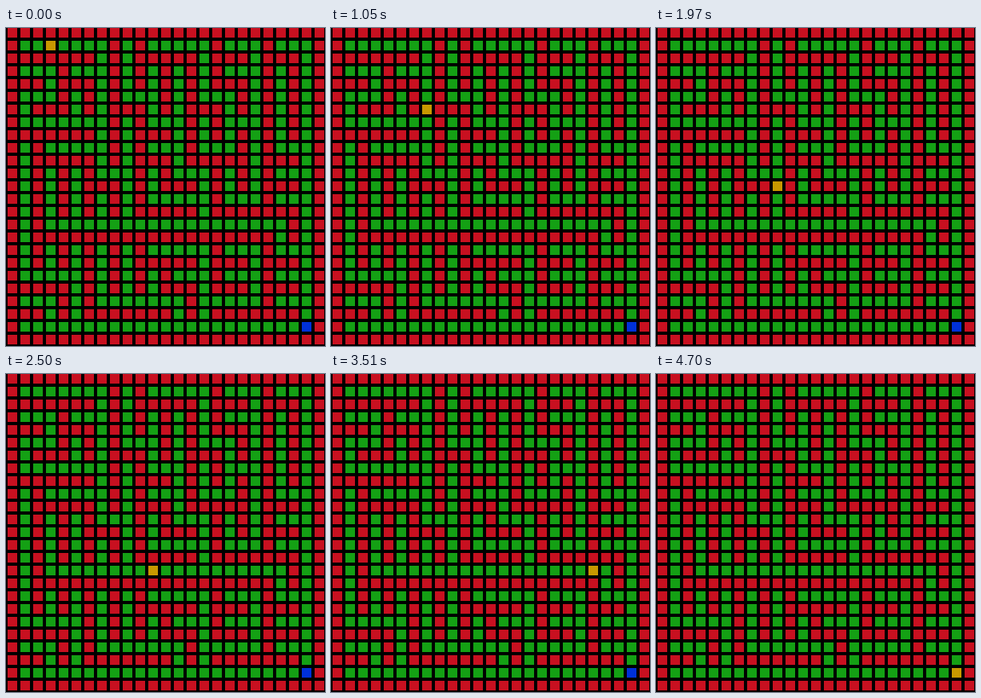
Animation, 399 px wide and 398 px high, one loop 5030 ms. Source, as an HTML page with a canvas:

```html
<!DOCTYPE html>
<html>
<head>
<meta charset="utf-8">
<title>Maze walk</title>
<style>
html, body { margin: 0; height: 100%; overflow: hidden; background: #000; }
canvas { display: block; }
</style>
</head>
<body>
<canvas width="399" height="398"></canvas>
<script>
const ctx = document.querySelector('canvas').getContext('2d');
const LOOP = 5030, SIZE = 25, PITCH = 16, CELL = 12;
const WALL = '#c81020', FLOOR = '#14a014', GOAL = '#0030d8', WALKER = '#c89800';

// Corridors, in cell coordinates
const corridors = new Path2D(`
  M1 1H7V11H9V15 M7 3H5 M5 5V7 M1 3H3V5H1V7H7 M3 9H7
  M9 1V5H11V3 M11 5V7H13 M13 3V11H15V15 M11 9H13
  M11 1H15V5H17V9H15V7 M17 1H19V13H17V11 M17 3H19 M17 7H19
  M21 1H23V23H1 M21 3V9H23 M21 11H23 M21 13H23
  M9 7V11 M11 11V13H15 M3 11V15H21V17H23 M5 11V15 M7 13V15
  M1 9V19H5 M3 17V19 M5 17V23 M1 21H3V23
  M7 17V21H13V23 M9 17V21 M11 19V21 M11 17H15V23 M13 19H15
  M15 21H19V17H17 M17 19H19 M21 19H23 M21 21H23`);

// Every cell on the way to the goal
const corners = [[3, 1], [7, 1], [7, 11], [9, 11], [9, 15], [21, 15], [21, 17], [23, 17], [23, 23]];
const route = [corners[0]];
for (const [endX, endY] of corners) {
  let [x, y] = route.at(-1);
  while (x !== endX || y !== endY) {
    x += Math.sign(endX - x);
    y += Math.sign(endY - y);
    route.push([x, y]);
  }
}

// Wait before each step: mostly 130 ms, with some quick ones
const quickSteps = new Set([1, 7, 13, 17, 19, 22, 25, 30, 33, 36, 39, 42]);
const oddWaits = { 4: 120, 5: 140, 27: 90 };
const arrivals = [0];
for (let i = 1; i < route.length; i++) {
  arrivals.push(arrivals[i - 1] + (quickSteps.has(i) ? 70 : oddWaits[i] || 130));
}

function fillCell([x, y], color) {
  ctx.fillStyle = color;
  ctx.fillRect(x * PITCH + 2, y * PITCH, CELL, CELL);
}

function drawMaze() {
  ctx.fillStyle = WALL;
  ctx.fillRect(0, 0, 399, 398);
  ctx.save();
  ctx.setTransform(PITCH, 0, 0, PITCH, 8, 6);
  ctx.lineCap = 'square';
  ctx.strokeStyle = FLOOR;
  ctx.stroke(corridors);
  ctx.restore();
  ctx.fillStyle = '#000';
  for (let i = 0; i <= SIZE; i++) {
    ctx.fillRect(i * PITCH - 2, 0, 4, 398);
    ctx.fillRect(0, i * PITCH - 4, 399, 4);
  }
}

const start = performance.now();
function frame() {
  const time = (performance.now() - start) % LOOP;
  drawMaze();
  fillCell(corners.at(-1), GOAL);
  fillCell(route[arrivals.findLastIndex(t => t <= time)], WALKER);
  requestAnimationFrame(frame);
}
frame();
</script>
</body>
</html>
```
